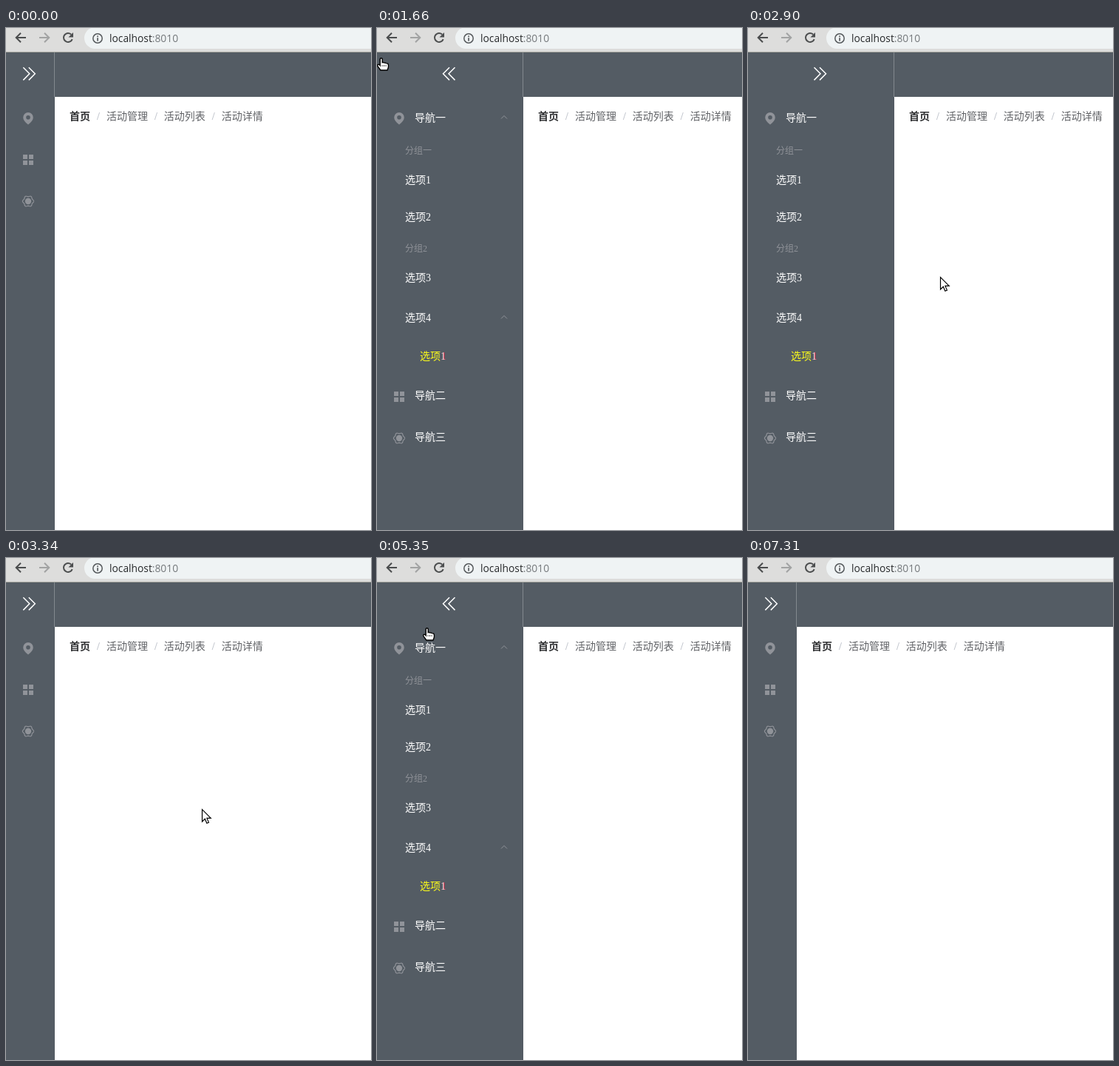
Write an HTML page with a canvas that moves like this. It is 494x678 px and loops after 8 s.

```html
<!DOCTYPE html>
<html lang="zh-CN">
<head>
<meta charset="utf-8">
<title>Sidebar menu</title>
<style>
html, body { margin: 0; width: 100%; height: 100%; overflow: hidden; background: #fff; }
canvas { display: block; width: 494px; height: 678px; }
</style>
</head>
<body>
<canvas id="stage" width="494" height="678"></canvas>
<script>
const ctx = document.getElementById('stage').getContext('2d');
const LOOP = 8000, NARROW = 66, WIDE = 198;
const SLATE = '#545c64', MUTED = '#909399';
const SERIF = '"Liberation Serif", "Noto Sans CJK SC", "Noto Sans CJK", serif';
const SANS = '"Open Sans", "Noto Sans", sans-serif';

// Screen updates: start, end, number of intervals
const BURSTS = [[1080, 1660, 14], [2380, 3070, 15], [3340, 4140, 16], [4190, 4340, 3],
  [5350, 5700, 7], [5850, 5940, 2], [6400, 6440, 1]];

// Menu cycles: widening starts, menu opens, submenu starts, its duration, narrowing starts, closes
const CYCLES = [
  { grow: 1249, open: 1549, sub: 1550, subTime: 110, shrink: 2690, close: 3069 },
  { grow: 3690, open: 3990, sub: 4040, subTime: 300, shrink: 5475, close: 5939 }
];

// Pointer: time, x, y
const POINTER = [[1080, 250, 640], [1249, 62, 132], [1369, 0, 40], [2340, 0, 40], [2656, 198, 284],
  [2800, 258, 334], [3070, 265, 339], [3340, 265, 339], [3690, 62, 110], [3890, 15, 44],
  [5310, 15, 44], [5550, 298, 346], [6399, 298, 346], [6400, 383, 305], [6440, 383, 305]];

const clamp = p => Math.max(0, Math.min(1, p));
const ease = p => { p = clamp(p); return p * p * (3 - 2 * p); };

function snap(t) {
  let out = 0;
  for (const [a, b, n] of BURSTS) {
    if (t < a) break;
    const step = (b - a) / n;
    out = t >= b ? b : a + Math.floor((t - a) / step + 1e-6) * step;
  }
  return out;
}

function menuState(t) {
  const s = { side: NARROW, width: NARROW, mode: 'closed', sub: 0, left: false };
  for (const c of CYCLES) {
    if (t < c.grow || t >= c.close) continue;
    s.left = t < c.shrink;
    if (t < c.open) {
      s.mode = 'growing';
      s.width = NARROW + (WIDE - NARROW) * ease((t - c.grow) / 300);
    } else {
      s.mode = 'open';
      s.side = WIDE;
      s.sub = ease((t - c.sub) / c.subTime);
      s.width = WIDE - (WIDE - NARROW) * ease((t - c.shrink) / 300);
    }
  }
  return s;
}

function pointerAt(t) {
  if (t < POINTER[0][0] || t >= 6440) return null;
  const i = POINTER.findIndex(k => k[0] > t);
  const [t0, x0, y0] = POINTER[i - 1], [t1, x1, y1] = POINTER[i];
  const p = (t - t0) / (t1 - t0);
  return [Math.round(x0 + (x1 - x0) * p), Math.round(y0 + (y1 - y0) * p)];
}

function box(x, y, w, h, color) {
  ctx.fillStyle = color;
  ctx.fillRect(x, y, w, h);
}

function text(str, x, y, color, size = 14, weight = 400, family = SERIF) {
  ctx.font = `${weight} ${size}px ${family}`;
  ctx.fillStyle = color;
  ctx.fillText(str, x, y);
}

function line(points, color, width) {
  ctx.beginPath();
  points.forEach(([x, y]) => ctx.lineTo(x, y));
  ctx.strokeStyle = color;
  ctx.lineWidth = width;
  ctx.stroke();
}

function disc(x, y, r, color) {
  ctx.beginPath();
  ctx.arc(x, y, r, 0, 7);
  ctx.fillStyle = color;
  ctx.fill();
}

function browserBar() {
  box(0, 0, 494, 33, '#dddddc');
  box(0, 32, 494, 1, '#a3a49e');
  ctx.beginPath();
  ctx.roundRect(106, -1, 420, 29, 14.5);
  ctx.fillStyle = '#eff3f4';
  ctx.fill();
  const dark = '#4b4d4e', pale = '#a2a3a3';
  line([[27, 13], [14, 13]], dark, 2);
  line([[20, 6.7], [13.7, 13], [20, 19.3]], dark, 2);
  line([[45, 13], [58, 13]], pale, 2);
  line([[52, 6.7], [58.3, 13], [52, 19.3]], pale, 2);
  ctx.beginPath();
  ctx.arc(84, 13, 6, 0.35, 5.5);
  ctx.strokeStyle = dark;
  ctx.lineWidth = 2;
  ctx.stroke();
  ctx.beginPath();
  ctx.moveTo(91, 6);
  ctx.lineTo(91, 12.5);
  ctx.lineTo(84.5, 12.5);
  ctx.fillStyle = dark;
  ctx.fill();
  ctx.beginPath();
  ctx.arc(124, 14, 6.2, 0, 7);
  ctx.strokeStyle = '#55595c';
  ctx.lineWidth = 1.5;
  ctx.stroke();
  box(123.2, 10.4, 1.7, 1.7, '#55595c');
  box(123.2, 13.2, 1.7, 4.4, '#55595c');
  text('localhost', 140, 19, '#27292b', 13.8, 400, SANS);
  text(':8010', 197.8, 19, '#75797c', 13.8, 400, SANS);
}

function breadcrumb(x) {
  text('首页', x, 124, '#303133', 14, 700);
  ['活动管理', '活动列表', '活动详情'].forEach((label, i) => {
    const at = x + 37 + i * 77.9;
    text('/', at, 124, '#c0c4cc', 14, 700);
    text(label, at + 12.9, 124, '#606266');
  });
}

function toggle(x, left) {
  const d = left ? -1 : 1;
  for (const s of [-8, -0.5]) {
    const a = x + d * s, b = x + d * (s + 8.5);
    line([[a, 53.2], [b, 61.8], [a, 70.4]], '#fff', 1.5);
  }
}

function pinIcon(y) {
  ctx.beginPath();
  ctx.moveTo(30, y + 8.5);
  ctx.bezierCurveTo(25.5, y + 5, 23.2, y + 2, 23.2, y - 1.2);
  ctx.arc(30, y - 1.2, 6.8, Math.PI, 0);
  ctx.bezierCurveTo(36.8, y + 2, 34.5, y + 5, 30, y + 8.5);
  ctx.moveTo(32.8, y - 1.2);
  ctx.arc(30, y - 1.2, 2.8, 0, 2 * Math.PI);
  ctx.fillStyle = MUTED;
  ctx.fill('evenodd');
}

function gridIcon(y) {
  for (const dx of [23, 31])
    for (const dy of [-7, 1]) box(dx, y + dy, 6, 6, MUTED);
}

function gearIcon(y) {
  const rim = [];
  for (let i = 0; i <= 60; i++) {
    const a = i * Math.PI / 30, r = 6.9 + 0.7 * Math.cos(6 * a);
    rim.push([30 + r * Math.cos(a), y + r * Math.sin(a)]);
  }
  line(rim, MUTED, 1.2);
  disc(30, y, 4.2, MUTED);
}

function caret(y) {
  line([[168, y + 2], [172, y - 2], [176, y + 2]], MUTED, 1);
}

function group(name, tail, y, wrapped, gap) {
  text(wrapped ? name : name + tail, 38, y, MUTED, 12);
  if (wrapped) text(tail, 38, y + gap, MUTED, 12);
}

function openMenu(s) {
  const wrapped = s.width < 74;
  const a = wrapped ? 18 : 0, b = wrapped ? 33 : 0;
  const subY = 418 + b, navY = 448 + b + Math.round(50 * s.sub);
  pinIcon(122);
  gridIcon(navY);
  gearIcon(navY + 56);
  ctx.save();
  ctx.beginPath();
  ctx.rect(0, 93, Math.max(s.width, 67), 585);
  ctx.clip();
  text('导航一', 51, 126, '#fff');
  group('分组', '一', 170, wrapped, 17);
  text('选项1', 38, 210 + a, '#fff');
  text('选项2', 38, 260 + a, '#fff');
  group('分组', '2', 302 + a, wrapped, 33 - a);
  text('选项3', 38, 342 + b, '#fff');
  text('选项4', 38, 396 + b, '#fff');
  text('导航二', 51, navY + 3, '#fff');
  text('导航三', 51, navY + 59, '#fff');
  if (s.width === WIDE) {
    caret(120.5);
    caret(390.5);
  }
  ctx.beginPath();
  ctx.rect(0, subY, WIDE, 50 * s.sub);
  ctx.clip();
  text('选项', 58, subY + 30, '#ffff1a');
  text('1', 87, subY + 30, '#f02040');
  text('1', 86, subY + 30, '#e6dfe0');
  ctx.restore();
}

function closedMenu(s, hover) {
  if (s.mode === 'growing') box(0, 93, Math.round(s.width), 168, SLATE);
  if (hover) box(0, 93, Math.round(s.width), 56, '#4a4a4a');
  pinIcon(122);
  gridIcon(178);
  gearIcon(234);
}

const ARROW = new Path2D('M.5 .7V17L4.3 13.4L6.8 19.2L9.4 18.1L6.9 12.4H12.2Z');
const HAND = new Path2D('M4.2 10V2.2Q4.2 .7 5.7 .7T7.2 2.2V6.6Q8.5 6 9.6 7Q11 6.5 12.1 7.6' +
  'Q15.4 7.4 15.4 10V13L14 17H4.8L1 11.6Q.2 9.8 1.4 9.3Q2.8 8.8 4.2 10.6Z');

function pointer([x, y], hand) {
  ctx.save();
  ctx.translate(x, y);
  const shape = hand ? HAND : ARROW;
  ctx.fillStyle = '#fff';
  ctx.fill(shape);
  ctx.strokeStyle = '#000';
  ctx.lineWidth = hand ? 1.4 : 1.2;
  ctx.stroke(shape);
  if (hand) for (const dx of [6.5, 9, 11.5]) box(dx, 10, 1, 2, '#444');
  ctx.restore();
}

function draw(time) {
  const t = snap(time), s = menuState(t), p = pointerAt(t);
  box(0, 0, 494, 678, '#fff');
  box(0, 33, 494, 60, SLATE);
  box(0, 93, s.side, 585, SLATE);
  box(s.side - 1, 33, 1, 60, '#83898e');
  breadcrumb(s.side + 20);
  if (s.mode === 'open') openMenu(s);
  else closedMenu(s, t >= 1249 && t < 1400);
  toggle(s.side === WIDE ? 97.5 : 31.3, s.left);
  browserBar();
  if (p) pointer(p, p[0] <= s.side);
}

function tick() {
  draw(performance.now() % LOOP);
  requestAnimationFrame(tick);
}
tick();
</script>
</body>
</html>
```
